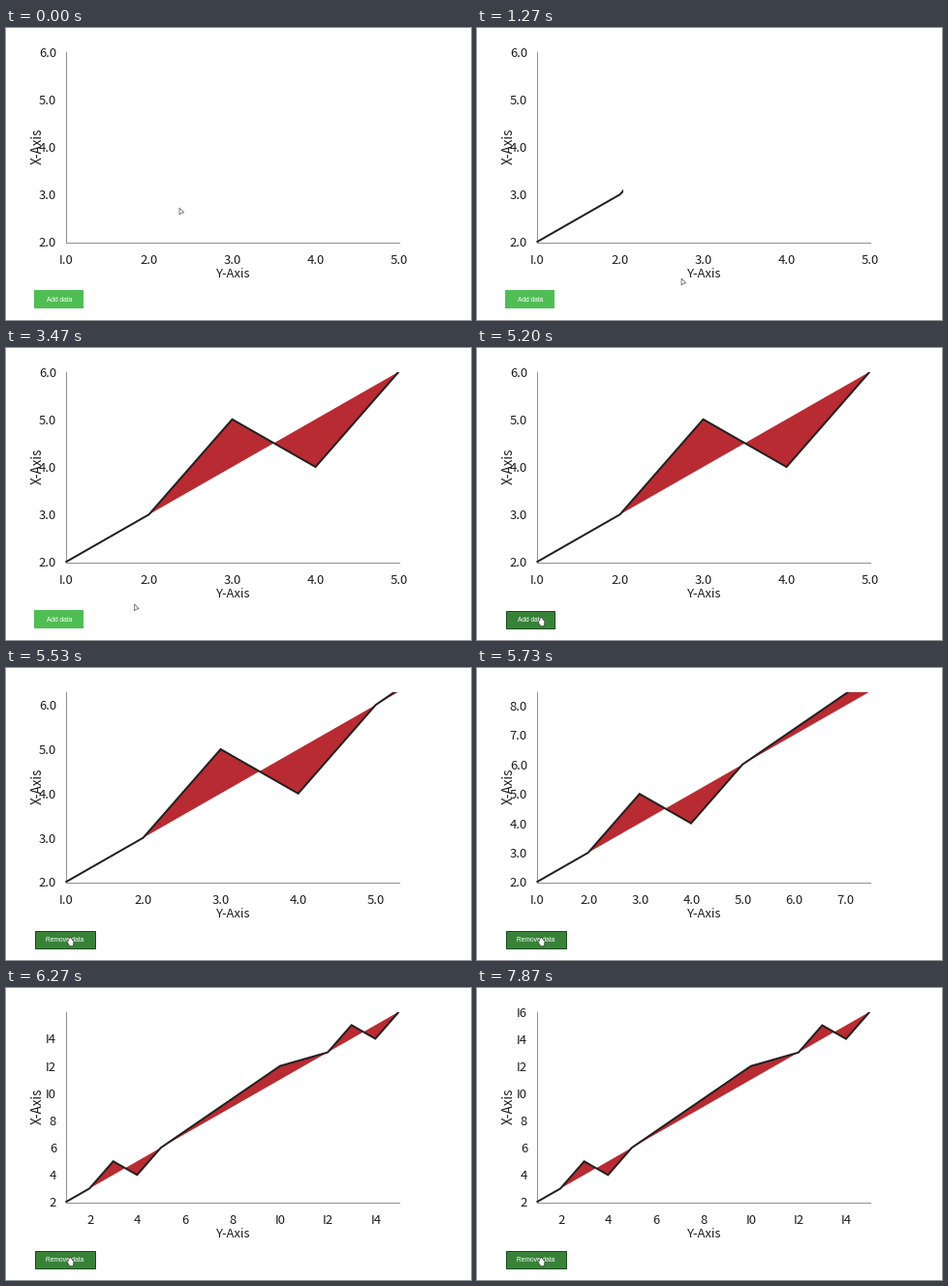
A matplotlib script that plays this animation: 480 px wide and 302 px high, repeating every 8 s.

```python
import numpy as np
import matplotlib.pyplot as plt
from matplotlib.animation import FuncAnimation
from matplotlib.patches import Polygon, Rectangle

W, H, DPI = 480, 302, 100
INTERVAL, LOOP, RATE = 25, 8000, 15
LEFT, RIGHT, TOP, BOTTOM = 61.5, 405.5, 24.5, 221.5

REVEAL, REVEAL_TIME = 990, 1500
PRESS, GROW, GROW_TIME, SETTLED = 5200, 5338, 1000, 7860

FONT, PT = "Noto Sans CJK JP", 72 / DPI
INK, RED, GREY = "#231f20", "#b82b32", "#909090"
GREEN, DARK, EDGE = "#50be54", "#388238", "#1d4a1f"

# The series follows y = x + 1 with one zigzag; more data repeats it ten units on
xs = np.arange(1, 6)
SHORT = np.column_stack([xs, xs + 1 + (xs == 3) - (xs == 4)])
LONG = np.vstack([SHORT, (10, 12), SHORT[1:] + 10])

ARROW = np.array([(0, 0), (0, 7), (1.8, 5.4), (4.7, 4.9)])
HAND = np.array([(-0.4, 0), (0.8, 0), (4, 4), (3, 8.5), (-0.4, 8.5), (-2.5, 5)])


def ramp(t, start, length):
    return np.clip((t - start) / length, 0, 1)


def ease(u):
    """Cubic bezier (.25, .1, .25, 1)."""
    s = np.linspace(0, 1, 400)
    a, b, c = 3 * (1 - s) ** 2 * s, 3 * (1 - s) * s ** 2, s ** 3
    return np.interp(u, 0.25 * (a + b) + c, 0.1 * a + b + c)


def cubic_in_out(u):
    return 4 * u ** 3 if u < 0.5 else 1 - 4 * (1 - u) ** 3


def ticks(lo, hi):
    """Tick values with their labels."""
    step = 1 if hi - lo < 7.07 else 2
    digits = 1 if step == 1 else 0
    values = np.arange(np.ceil(lo / step) * step, hi + 1e-6, step)
    # the digit one is a plain bar in this style
    return [(v, f"{v:.{digits}f}".replace("1", "I")) for v in values]


fig = plt.figure(figsize=(W / DPI, H / DPI), dpi=DPI, facecolor="white")
ax = fig.add_axes([0, 0, 1, 1])
ax.set(xlim=(0, W), ylim=(H, 0))
ax.axis("off")


def label(x, y, text="", size=13, ha="center", color="#1c1c1c", font=FONT, **kw):
    return ax.text(x, y, text, fontsize=size * PT, ha=ha, va="baseline",
                   color=color, family=font, **kw)


area = ax.add_patch(Polygon(SHORT, closed=True, fc=RED, lw=0, zorder=2))
line, = ax.plot([], [], color=INK, lw=2 * PT, solid_joinstyle="miter",
                solid_capstyle="butt", zorder=3)
ax.plot([LEFT, LEFT, RIGHT], [TOP, BOTTOM, BOTTOM], color=GREY, lw=PT, zorder=1)

x_labels = [label(0, 244.5) for _ in range(10)]
y_labels = [label(52, 0, ha="right") for _ in range(10)]
label(234.5, 258.5, "Y-Axis")
label(36.8, 122.5, "X-Axis", 13.5, rotation=90, rotation_mode="anchor")

button = ax.add_patch(Rectangle((0, 0), 1, 1, lw=PT, zorder=4))
caption = label(0, 283, "", 6.7, color="white", font="Liberation Sans", zorder=5)
pointer = ax.add_patch(Polygon(ARROW, closed=True, fc="white", zorder=6))


def fill_labels(pool, values, place):
    for text in pool:
        text.set_visible(False)
    for text, (value, name) in zip(pool, values):
        text.set_visible(True)
        text.set_text(name)
        place(text, value)


def draw_chart(t):
    grow = cubic_in_out(ramp(t, GROW, GROW_TIME))
    if t < SETTLED:
        grow = min(grow, 0.9995)
    span = 4 + 10 * grow

    def px(x):
        return LEFT + (x - 1) / span * (RIGHT - LEFT)

    def py(y):
        return BOTTOM - (y - 2) / span * (BOTTOM - TOP)

    data = LONG if t >= GROW else SHORT
    points = np.column_stack([px(data[:, 0]), py(data[:, 1])])
    area.set_xy(points)
    line.set_data(points[:, 0], points[:, 1])

    shown = ease(ramp(t, REVEAL, REVEAL_TIME))
    window = Rectangle((LEFT - 0.5, TOP), shown * (RIGHT - LEFT) + 1,
                       BOTTOM - TOP + 0.5, transform=ax.transData)
    for artist in (area, line):
        artist.set_visible(shown > 0)
        artist.set_clip_path(window)

    fill_labels(x_labels, ticks(1, 1 + span), lambda s, v: s.set_x(px(v) + 0.5))
    fill_labels(y_labels, ticks(2, 2 + span), lambda s, v: s.set_y(py(v) + 5))


def draw_button(t, over):
    text, width = ("Remove data", 63) if t >= GROW - 10 else ("Add data", 51)
    pad = 0.5 if t >= PRESS else 0
    button.set_bounds(29 + pad, 271 + pad, width - 2 * pad, 19 - 2 * pad)
    button.set_facecolor(DARK if over else GREEN)
    button.set_edgecolor(EDGE if t >= PRESS else "none")
    caption.set_text(text)
    caption.set_x(29.5 + width / 2)


def pointer_tip(t):
    """Drift down, settle, then curve over to the button."""
    down, back, away = ramp(t, 70, 460), ramp(t, 930, 200), ramp(t, 2990, 880)
    x = 179 + 50 * down - 18 * back - 145 * away
    y = 186 + 71 * down + 2 * back + 20 * away ** 2
    return x, y


def draw_pointer(tip, over):
    pointer.set_xy((HAND if over else ARROW) + tip)
    pointer.set_edgecolor("#222222" if over else "#666666")
    pointer.set_linewidth((0.5 if over else 0.8) * PT)


def update(i):
    # motion advances in RATE steps per second
    step = int((i * INTERVAL + INTERVAL - 1) * RATE / 1000)
    t = step * 1000 / RATE
    tip = pointer_tip(t)
    over = tip[0] < 85
    draw_chart(t)
    draw_button(t, over)
    draw_pointer(tip, over)
    return []


anim = FuncAnimation(fig, update, frames=LOOP // INTERVAL, interval=INTERVAL,
                     init_func=lambda: update(0), repeat=True, repeat_delay=0)
plt.show()
```
